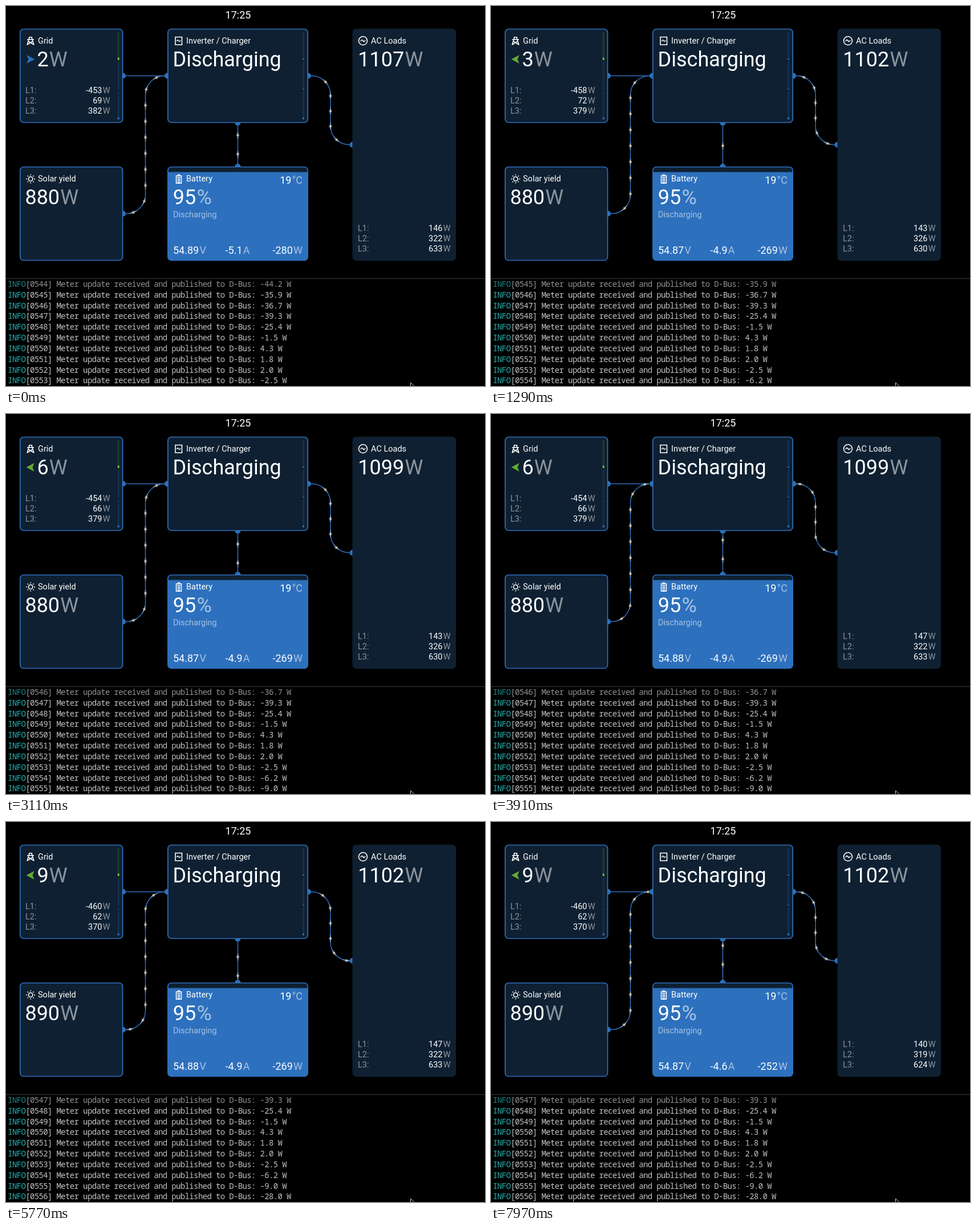
Write an HTML page with a canvas that moves like this. It is 840 by 667 pixels and loops after 7990 ms.

```html
<!DOCTYPE html>
<html lang="en">
<head>
<meta charset="utf-8">
<title>Energy overview</title>
<style>
html, body { margin: 0; width: 100%; height: 100%; overflow: hidden; background: #000; }
canvas { display: block; }
</style>
</head>
<body>
<canvas id="stage" width="840" height="667"></canvas>
<script>
const ctx = document.getElementById('stage').getContext('2d');
const LOOP = 7990;
const BLUE = '#2d70bd', CARD = '#0f2032', WHITE = '#fff', GREY = '#8b949d';
const ON_BLUE = 'rgba(255,255,255,.58)', GREEN = '#62ab34';

// Values per update; the meter and the system report at different moments.
const METER_TICKS = [1, 57, 117];
const SYSTEM_TICKS = [23, 83, 143];
const METER = [
  { grid: 2, phases: [-453, 69, 382], loads: 1107, solar: 880 },
  { grid: 3, phases: [-458, 72, 379], loads: 1102, solar: 880 },
  { grid: 6, phases: [-454, 66, 379], loads: 1099, solar: 880 },
  { grid: 9, phases: [-460, 62, 370], loads: 1102, solar: 890 },
];
const SYSTEM = [
  { phases: [146, 322, 633], battery: ['54.89', '-5.1', '-280'] },
  { phases: [143, 326, 630], battery: ['54.87', '-4.9', '-269'] },
  { phases: [147, 322, 633], battery: ['54.88', '-4.9', '-269'] },
  { phases: [140, 319, 624], battery: ['54.87', '-4.6', '-252'] },
];
const READINGS = [-44.2, -35.9, -36.7, -39.3, -25.4, -1.5, 4.3, 1.8, 2, -2.5, -6.2, -9, -28];

// Playback comes in bursts: three ticks per 140 ms, after a short stall.
function ticksAt(ms) {
  if (ms < 150) return ms < 20 ? 0 : 1;
  const u = ms - 130, r = u % 140;
  return 8 + Math.floor(u / 140) * 3 + (r < 20 ? 0 : r < 40 ? 1 : 2);
}
const stepOf = (ticks, moments) => moments.filter(m => ticks >= m).length;

// Draws a value and an optional unit beside it; align is 0 (left), .5 or 1 (right).
const UNIT_GAP = 1.2;
function text(x, y, size, runs, align = 0) {
  ctx.font = `${size}px Roboto, sans-serif`;
  const widths = runs.map(([s]) => ctx.measureText(s).width);
  const total = widths.reduce((a, b) => a + b) + UNIT_GAP * (runs.length - 1);
  x -= align * total;
  runs.forEach(([s, color], i) => {
    ctx.fillStyle = color;
    ctx.fillText(s, x, y);
    x += widths[i] + UNIT_GAP;
  });
}
const label = (x, y, s) => text(x, y, 14.5, [[s, WHITE]]);
const big = (x, y, s, unit = '', color = GREY) => text(x, y, 36, [[s, WHITE], [unit, color]]);

function rect(x, y, w, h, color) {
  ctx.fillStyle = color;
  ctx.fillRect(x, y, w, h);
}
function shape(d, fill, stroke, width = 1.5) {
  const p = new Path2D(d);
  if (fill) { ctx.fillStyle = fill; ctx.fill(p); }
  if (stroke) { ctx.strokeStyle = stroke; ctx.lineWidth = width; ctx.stroke(p); }
}
function disc(x, y, r, color) {
  ctx.beginPath();
  ctx.arc(x, y, r, 0, 2 * Math.PI);
  ctx.fillStyle = color;
  ctx.fill();
}
function card(x, y, w, h, border = BLUE) {
  ctx.beginPath();
  ctx.roundRect(x, y, w, h, 6);
  ctx.fillStyle = CARD;
  ctx.fill();
  ctx.strokeStyle = border;
  ctx.lineWidth = 1.7;
  ctx.stroke();
}
function phaseList(x, right, y, values) {
  values.forEach((v, i) => {
    const row = y + i * 18;
    text(x, row, 14.5, [[`L${i + 1}:`, GREY]]);
    text(right, row, 14.5, [[String(v), WHITE], ['W', GREY]], 1);
  });
}

// Connector paths; start is the place of a pulse at tick 0, speed is pixels per tick.
const CONNECTORS = [
  { d: 'M205 364.5h6a33.5 33.5 0 0 0 33.5 -33.5V156a33.5 33.5 0 0 1 33.5 -33.5h6', gap: 28.1, start: 18.6, speed: .388 },
  { d: 'M406.5 282V205', gap: 33.3, start: 22, speed: .435 },
  { d: 'M530 122.5h6a33 33 0 0 1 33 33V210.5a33 33 0 0 0 33 33h6', gap: 26.7, start: 6.7, speed: .359 },
].map(c => {
  const path = document.createElementNS('http://www.w3.org/2000/svg', 'path');
  path.setAttribute('d', c.d);
  return { ...c, path, length: path.getTotalLength() };
});

function drawPulse(path, s) {
  const at = d => path.getPointAtLength(s + d);
  for (let d = -8; d < 6; d++) {
    const a = at(d), b = at(d + 1);
    ctx.strokeStyle = `rgba(255,255,255,${.9 * (1 - Math.abs(d + .5) / 8.5)})`;
    ctx.lineWidth = 1.6;
    ctx.beginPath();
    ctx.moveTo(a.x, a.y);
    ctx.lineTo(b.x, b.y);
    ctx.stroke();
  }
  const p = at(0);
  disc(p.x, p.y, 2.8, 'rgba(150,150,145,.6)');
  disc(p.x, p.y, 1.2, '#eee');
}

function drawConnectors(ticks) {
  shape('M205 122.5H284', null, BLUE);
  for (const { d, path, length, gap, start, speed } of CONNECTORS) {
    shape(d, null, BLUE);
    for (let s = (start + speed * ticks) % gap; s < length - 8; s += gap) {
      if (s > 8) drawPulse(path, s);
    }
  }
  for (const [x, y] of [[205, 122.5], [283, 122.5], [205, 364.5], [406.5, 205], [406.5, 282], [530, 122.5], [607.5, 243.5]]) {
    disc(x, y, 5, BLUE);
  }
}

function drawGauge(x, tips, first = '#15304b') {
  tips.forEach(([y, h, color], i) => {
    rect(x, 46 + i * 52, 3, 49, i ? '#15304b' : first);
    if (h) rect(x, y, 3, h, color);
  });
}

function drawIcons() {
  // Pylon
  shape('M40 54.8H46M37 58.8H49M41.2 54.8L37 68.5M44.8 54.8L49 68.5M39.5 62L48 67.5M46.5 62L38 67.5', null, WHITE, 1.6);
  // Inverter
  shape('M297 54.5h11.5v13.5h-11.5z', null, WHITE, 1.6);
  shape('M299.5 62q1.6 -4 3.2 -1t3.2 -1', null, WHITE, 1.4);
  // AC loads
  shape('M618.5 61a7.5 7.5 0 1 0 15 0a7.5 7.5 0 1 0 -15 0', null, WHITE, 1.6);
  shape('M622 62q2 -4.5 4 -1t4 -1', null, WHITE, 1.6);
  // Sun
  shape('M39.5 303.5a3.7 3.7 0 1 0 7.4 0a3.7 3.7 0 1 0 -7.4 0', null, WHITE, 1.6);
  for (let i = 0; i < 8; i++) {
    const a = i * Math.PI / 4;
    disc(43.2 + 7 * Math.cos(a), 303.5 + 7 * Math.sin(a), 1, WHITE);
  }
  // Battery
  shape('M298.5 298h9v13h-9z', null, WHITE, 1.5);
  rect(301, 295.5, 4, 2, WHITE);
  for (let y = 300; y < 310; y += 3) rect(300.5, y, 5, 1.8, WHITE);
}

function drawDashboard(ticks) {
  const meter = METER[stepOf(ticks, METER_TICKS)];
  const system = SYSTEM[stepOf(ticks, SYSTEM_TICKS)];
  drawConnectors(ticks);
  text(407, 22, 18, [['17:25', WHITE]], .5);

  card(24.8, 40.5, 179.7, 164);
  label(56, 66, 'Grid');
  if (meter.grid === 2) shape('M36 86L50.5 93.5L36 101L39.5 93.5z', BLUE);
  else shape('M49.5 86L35.5 93.5L49.5 101L46.5 93.5z', GREEN);
  big(54.4, 106, meter.grid, 'W');
  phaseList(34, 182.5, 153, meter.phases);
  drawGauge(195.7, [[90.5, 4.5, '#72b832'], [0, 0], [195.5, 3.5, BLUE]], '#1c3c2a');

  card(283.9, 40.5, 245.3, 164);
  label(316, 66, 'Inverter / Charger');
  big(292.6, 106, 'Discharging');
  drawGauge(520, [[92.5, 2, BLUE], [145.5, 1.5, BLUE], [195.5, 3.5, BLUE]]);

  card(24.8, 282.5, 179.7, 164);
  label(56, 308, 'Solar yield');
  big(33.4, 348, meter.solar, 'W');

  card(608.3, 40.5, 180, 406, CARD);
  label(640, 66, 'AC Loads');
  big(617.3, 106, meter.loads, 'W');
  phaseList(617, 779.5, 395, system.phases);

  card(283.9, 282.5, 245.3, 164);
  ctx.beginPath();
  ctx.roundRect(284, 291.5, 245, 155, [0, 0, 6, 6]);
  ctx.fillStyle = BLUE;
  ctx.fill();
  label(316, 308, 'Battery');
  text(520, 311.5, 18, [['19', WHITE], ['°C', ON_BLUE]], 1);
  big(292.8, 348, '95', '%', ON_BLUE);
  text(293, 371, 14.5, [['Discharging', ON_BLUE]]);
  const [volts, amps, watts] = system.battery;
  text(293, 434.5, 18, [[volts, WHITE], ['V', ON_BLUE]]);
  text(406, 434.5, 18, [[amps, WHITE], ['A', ON_BLUE]], .5);
  text(520, 434.5, 18, [[watts, WHITE], ['W', ON_BLUE]], 1);
  drawIcons();
}

function drawLog(ticks) {
  rect(0, 478, 840, 1, '#3c3c3c');
  ctx.font = '14px "Noto Sans Mono", monospace';
  ctx.letterSpacing = '-0.64px';
  const first = stepOf(ticks, METER_TICKS);
  const messageX = 3.2 + ctx.measureText('INFO').width;
  for (let i = 0; i < 10; i++) {
    const n = first + i, y = 493 + i * 18.83;
    ctx.globalAlpha = i ? 1 : .75;
    ctx.fillStyle = '#25b0b0';
    ctx.fillText('INFO', 3.2, y);
    ctx.fillStyle = '#c2c2c2';
    ctx.fillText(`[0${544 + n}] Meter update received and published to D-Bus: ${READINGS[n].toFixed(1)} W`, messageX, y);
  }
  ctx.letterSpacing = '0px';
  ctx.globalAlpha = 1;
  ctx.lineJoin = 'round';
  shape('M709.5 661V677L720 671.5z', '#000', '#ccc', 1);
  ctx.lineJoin = 'miter';
}

const origin = performance.now();
function frame() {
  const ticks = ticksAt((performance.now() - origin) % LOOP);
  rect(0, 0, 840, 667, '#000');
  drawDashboard(ticks);
  drawLog(ticks);
  requestAnimationFrame(frame);
}
frame();
</script>
</body>
</html>
```
